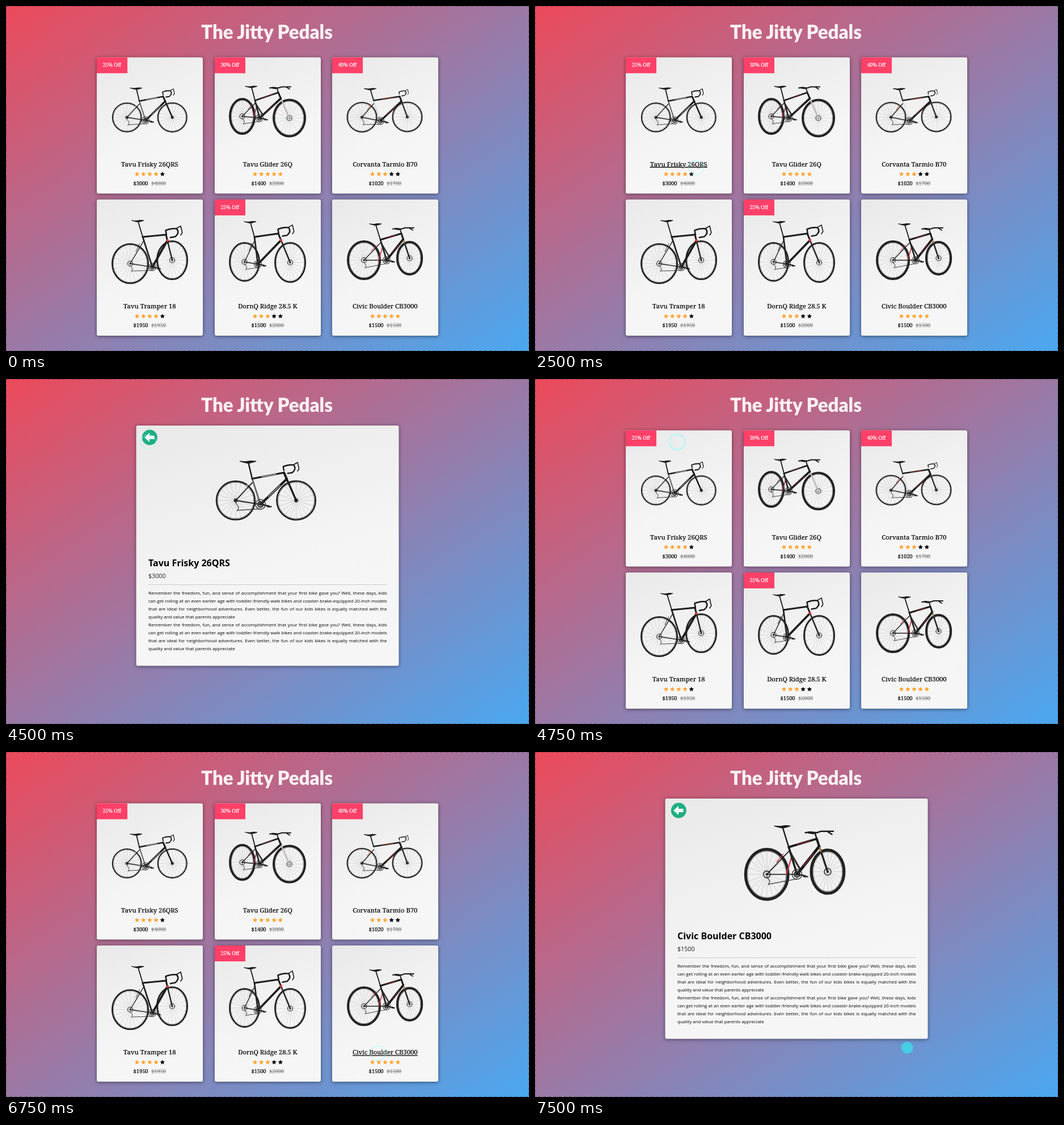
Write an HTML page that moves like this. It is 922 px wide and 608 px high and loops after 8000 ms.

```html
<!DOCTYPE html>
<html lang="en">
<head>
<meta charset="utf-8">
<title>The Jitty Pedals</title>
<style>
html, body { margin: 0; width: 100%; height: 100%; overflow: hidden; }
body { position: relative; background: linear-gradient(to bottom right, #ec4a5a, #4aa8f0); }
svg { position: absolute; left: 0; top: 0; display: block; }
.panel { fill: url(#paper); filter: drop-shadow(0 1px 3px rgba(0, 0, 0, .5)); }
.heading { font: 900 33px Lato, sans-serif; fill: #fdf1f4; text-anchor: middle; }
.card text { font: 500 9.3px "Noto Serif", serif; text-anchor: middle; stroke: #000; stroke-width: .2px; }
.card .name { font-size: 11.3px; text-underline-offset: 1.5px; }
.card .badge { font-size: 8.7px; fill: #fff; stroke: #fff; }
.card .old { fill: #777; stroke: none; text-decoration: line-through; }
#detail text { font: 10.7px "Open Sans", sans-serif; fill: #222; }
#detail #detailName { font-size: 16px; font-weight: 700; fill: #000; }
#copy { font: 8px/14px "Open Sans", sans-serif; color: #000; }
#copy div { text-align: justify; text-align-last: justify; white-space: nowrap; }
#copy div:nth-child(4n) { text-align-last: left; }
</style>
</head>
<body>
<svg width="922" height="608" viewBox="0 0 922 608">
  <defs>
    <linearGradient id="paper" x2=".35" y2="1">
      <stop stop-color="#e9e9e9"/><stop offset=".7" stop-color="#f5f5f5"/><stop offset="1" stop-color="#f6f6f6"/>
    </linearGradient>
  </defs>
  <rect x=".5" y=".5" width="921" height="607" fill="none" stroke="#3c283c" stroke-opacity=".45" stroke-dasharray="5 4"/>
  <text class="heading" x="460" y="58">The Jitty Pedals</text>
  <g id="list"></g>
  <g id="detail">
    <rect class="panel" x="229.5" y="82" width="463" height="423.5" rx="3"/>
    <circle cx="253.3" cy="103" r="13.5" fill="#1eae82"/>
    <path d="M244 103l9-8v5h8.5v6H253v5z" fill="#fff"/>
    <g id="detailBike" transform="translate(334 73) scale(1.333)"></g>
    <text id="detailName" x="251" y="330"></text>
    <text id="detailPrice" x="251" y="350.5"></text>
    <path d="M251 362.5H671" stroke="#ccc"/>
    <foreignObject x="251" y="370" width="420.5" height="120"><div id="copy" xmlns="http://www.w3.org/1999/xhtml"></div></foreignObject>
  </g>
  <circle id="ring" fill="none" stroke="#8ff" stroke-width="2"/>
  <circle id="disc" r="10.5" fill="#32ebf0" fill-opacity=".65"/>
</svg>
<script>
const $ = id => document.getElementById(id);

// Wheels are [cx, cy, rx, ry] to the outer edge; bar is the drop bar's scale, 0 means a flat bar.
const products = [
  { name: 'Tavu Frisky 26QRS', off: 25, stars: 4, price: 3000, old: 4000, rear: [53.2, 105.8, 26.4, 26.4], front: [133.2, 105.8, 26.6, 26.6],
    seat: [70, 56], joint: [75, 77], bb: [86, 111], head: [117, 69], tyre: 2.1, accent: '#ddd', post: '#666', fork: '#151515', bar: 1 },
  { name: 'Tavu Glider 26Q', off: 30, stars: 5, price: 1400, old: 2000, rear: [48.5, 104, 23.5, 32.5], front: [131.5, 107, 29.5, 34],
    seat: [65, 53], joint: [71, 76], bb: [79, 107], head: [112, 62], tyre: 4, accent: '#9c3550', fork: '#c5b4bc', bar: 0 },
  { name: 'Corvanta Tarmio B70', off: 40, stars: 3, price: 1020, old: 1700, rear: [52.5, 105.5, 27, 27], front: [132.5, 105, 27, 27],
    seat: [67.5, 57], joint: [73, 76], bb: [85, 112], head: [119, 69], tyre: 2.1, accent: '#cf4a35', post: '#ddd', fork: '#333', bar: .8 },
  { name: 'Tavu Tramper 18', stars: 4, price: 1950, old: 1950, rear: [59, 113, 33, 36], front: [133, 107, 28, 35],
    seat: [73, 39], joint: [81, 66], bb: [98, 119], head: [122, 62], tyre: 2.8, accent: '#333', fork: '#222', bar: 1.4 },
  { name: 'DornQ Ridge 28.5 K', off: 25, stars: 3, price: 1500, old: 2000, rear: [52.5, 110, 27.5, 35], front: [133, 111, 28, 36],
    seat: [63, 41], joint: [70, 66], bb: [76, 114], head: [112, 60], tyre: 2.8, accent: '#333', fork: '#222', bar: 1.35 },
  { name: 'Civic Boulder CB3000', stars: 5, price: 1500, old: 1500, rear: [56, 107, 30, 35], front: [136.5, 103.5, 23.6, 30.5],
    seat: [77, 45], joint: [85, 71], bb: [96, 107], head: [122, 60], tyre: 3.9, accent: '#c8323c', fork: '#222', tip: '#d79545', bar: 0 },
];

const mix = (a, b, k) => [a[0] + (b[0] - a[0]) * k, a[1] + (b[1] - a[1]) * k];
const line = (a, b, color, width) =>
  `<path d="M${a[0]} ${a[1]}L${b[0]} ${b[1]}" stroke="${color}" stroke-width="${width}"/>`;

function wheel([x, y, rx, ry], tyre) {
  let spokes = '';
  for (let i = 0; i < 20; i++) {
    const a = i * Math.PI / 10;
    spokes += `M${x} ${y}L${x + (rx - tyre) * Math.cos(a)} ${y + (ry - tyre) * Math.sin(a)}`;
  }
  const oval = (inset, color, width) =>
    `<ellipse cx="${x}" cy="${y}" rx="${rx - inset}" ry="${ry - inset}" stroke="${color}" stroke-width="${width}"/>`;
  return `<path d="${spokes}" stroke="#888" stroke-width=".25"/>` + oval(tyre / 2, '#222', tyre) +
    oval(tyre + .6, '#666', .5) + `<circle cx="${x}" cy="${y}" r="${tyre > 2.5 ? 4.5 : 2}" stroke="#333" stroke-width="1.2"/>` +
    `<circle cx="${x}" cy="${y}" r="1.5" fill="#222"/>`;
}

function bike({ rear, front, seat, joint, bb, head, tyre, accent, post = '#222', fork, tip, bar }) {
  const dark = '#191919', crown = mix(head, front, .23), [bx, by] = bb;
  const tube = tyre > 2.5 ? 3.2 : 2.6;
  const bars = bar
    ? `<g transform="translate(${head[0] - 2} ${head[1] - 9}) scale(${bar})"><path d="M2 6L1 1Q9-2 15-1Q19 4 13 9L7 10" stroke="${dark}" stroke-width="1.8"/>
       <path d="M14-1L20-4.5L22 4L20 7" stroke="${dark}" stroke-width="1.2"/></g>`
    : `<path d="M${head} l-2 -7 m-13 -1 l6 -1 9 1 6 -2 16 0 m-33 2 l7 1 m19 -2 l5 3" stroke="${dark}" stroke-width="1.9"/>`;
  const shock = bar ? '' :
    line(mix(joint, bb, .35), mix(bb, rear, .35), accent, 1.6) + line(mix(joint, bb, .2), mix(bb, head, .15), '#333', 2.5);
  return `<g fill="none" stroke-linecap="round" stroke-linejoin="round">` +
    wheel(rear, tyre) + wheel(front, tyre) +
    line(rear, bb, '#222', 1.4) + line(rear, mix(joint, bb, .12), '#222', 1.4) +
    line(mix(rear, joint, .45), mix(rear, joint, .75), accent, 1) +
    line(crown, front, fork, 2.4) + line(seat, joint, dark, 1.8) + shock +
    line(joint, bb, post, tube - .5) + line(joint, head, dark, tube - .3) + line(crown, bb, dark, tube + .5) +
    line(head, crown, dark, 3) +
    line(mix(joint, head, .3), mix(joint, head, .75), accent, .8) + line(mix(crown, bb, .25), mix(crown, bb, .7), accent, .8) +
    (bar > 1 ? `<circle cx="${crown[0]}" cy="${crown[1]}" r="2.4" fill="#d8383c"/>` : '') +
    (tip ? line(mix(crown, front, .05), mix(crown, front, .2), tip, 1.5) : '') +
    `<path d="M${seat[0] - 11} ${seat[1] - 2}q8 1 11 0t10 0q-6 2 -9 2.5t-12 -2.5z" fill="${dark}" stroke="${dark}"/>` + bars +
    `<circle cx="${bx}" cy="${by}" r="6.5" stroke="#333" stroke-width="1.1"/><circle cx="${bx}" cy="${by}" r="3.5" stroke="#333" stroke-width="2"/>` +
    `<path d="M${bb}l11 2m-2 1h5" stroke="#222" stroke-width="1.8"/>` +
    `<path d="M${rear[0]} ${rear[1] + 3}l4 6 -2 5M${rear[0] + 3} ${rear[1] + 13}L${bx} ${by + 6}" stroke="#333" stroke-width=".9"/></g>`;
}

function star(x, color) {
  let points = '';
  for (let i = 0; i < 10; i++) {
    const a = i * Math.PI / 5, r = i % 2 ? 2.1 : 4.4;
    points += `${x + r * Math.sin(a)},${205.8 - r * Math.cos(a)} `;
  }
  return `<polygon points="${points}" fill="${color}"/>`;
}

const cardAt = i => [Math.round(160 + i % 3 * 207.6), i < 3 ? 90.5 : 341];

$('list').innerHTML = products.map((p, i) => `<g class="card" transform="translate(${cardAt(i)})">
  <rect class="panel" width="187" height="240" rx="3"/>
  ${p.off ? `<path d="M3 0H54V28H0V3Q0 0 3 0" fill="#ff4068"/><text class="badge" x="26.7" y="16.7">${p.off}% Off</text>` : ''}
  ${bike(p)}
  <text class="name" x="93.3" y="192.3">${p.name}</text>
  ${[0, 1, 2, 3, 4].map(n => star(71 + n * 11.2, n < p.stars ? '#ffa532' : '#000')).join('')}
  <text x="93.3" y="225">$${p.price}<tspan class="old" dx="5.5">$${p.old}</tspan></text></g>`).join('');
const names = document.querySelectorAll('.name');

const copy = ['Remember the freedom, fun, and sense of accomplishment that your first bike gave you? Well, these days, kids',
  'can get rolling at an even earlier age with toddler-friendly walk bikes and coaster-brake-equipped 20-inch models',
  'that are ideal for neighborhood adventures. Even better, the fun of our kids bikes is equally matched with the',
  'quality and value that parents appreciate'];
$('copy').innerHTML = [...copy, ...copy].map(s => `<div>${s}</div>`).join('');

// Clicks: time, x, y. The pointer follows leg n after n clicks: start, end, from, to, bend.
const clicks = [[2500, 284, 285], [4500, 251, 111], [6750, 656, 531]];
const legs = [
  [500, 2500, [900, 60], [284, 285], [0, 0]],
  [3500, 4500, [284, 274], [251, 111], [0, 0]],
  [5000, 6500, [251, 101], [656, 531], [-9, 54]],
  [7500, 8000, [656, 521], [656, 521], [0, 0]],
];

function pointerAt(t, done) {
  const [start, end, from, to, bend] = legs[done];
  const u = Math.min(1, Math.max(0, (t - start) / (end - start)));
  const arc = Math.sin(Math.PI * u);
  return mix(from, to, u * u * (3 - 2 * u)).map((v, i) => v + bend[i] * arc);
}

const place = (el, [x, y]) => el.setAttribute('transform', `translate(${x} ${y})`);
const show = (el, on) => el.style.display = on ? '' : 'none';
let shown = -1;

function draw(t) {
  const done = clicks.filter(c => c[0] <= t).length;
  const last = clicks[done - 1], age = last ? t - last[0] : Infinity;
  const clicking = age < 750;
  const point = clicking ? last.slice(1) : pointerAt(t, done);

  show($('ring'), clicking);
  show($('disc'), !clicking && t >= 500);
  place($('ring'), point);
  place($('disc'), point);
  if (clicking) {
    $('ring').setAttribute('r', age ? 13.7 : 13);
    $('ring').setAttribute('stroke-opacity', .65 * Math.sin(Math.PI * (age + 250) / 1000) ** 2);
  }

  names.forEach((el, i) => {
    const [x, y] = cardAt(i);
    const over = t >= 500 && Math.abs(point[0] - x - 93.3) < 54 && Math.abs(point[1] - y - 188.5) < 9;
    el.style.textDecoration = over ? 'underline' : 'none';
  });

  const open = t >= 7000 ? 5 : t >= 2750 && t < 4750 ? 0 : -1;
  show($('list'), open < 0);
  show($('detail'), open >= 0);
  if (open >= 0 && open !== shown) {
    const p = products[shown = open];
    $('detailBike').innerHTML = bike(p);
    $('detailName').textContent = p.name;
    $('detailPrice').textContent = '$' + p.price;
  }
}

// The picture advances four times a second.
function tick() {
  draw(Math.floor(performance.now() % 8000 / 250) * 250);
  requestAnimationFrame(tick);
}
tick();
</script>
</body>
</html>
```
